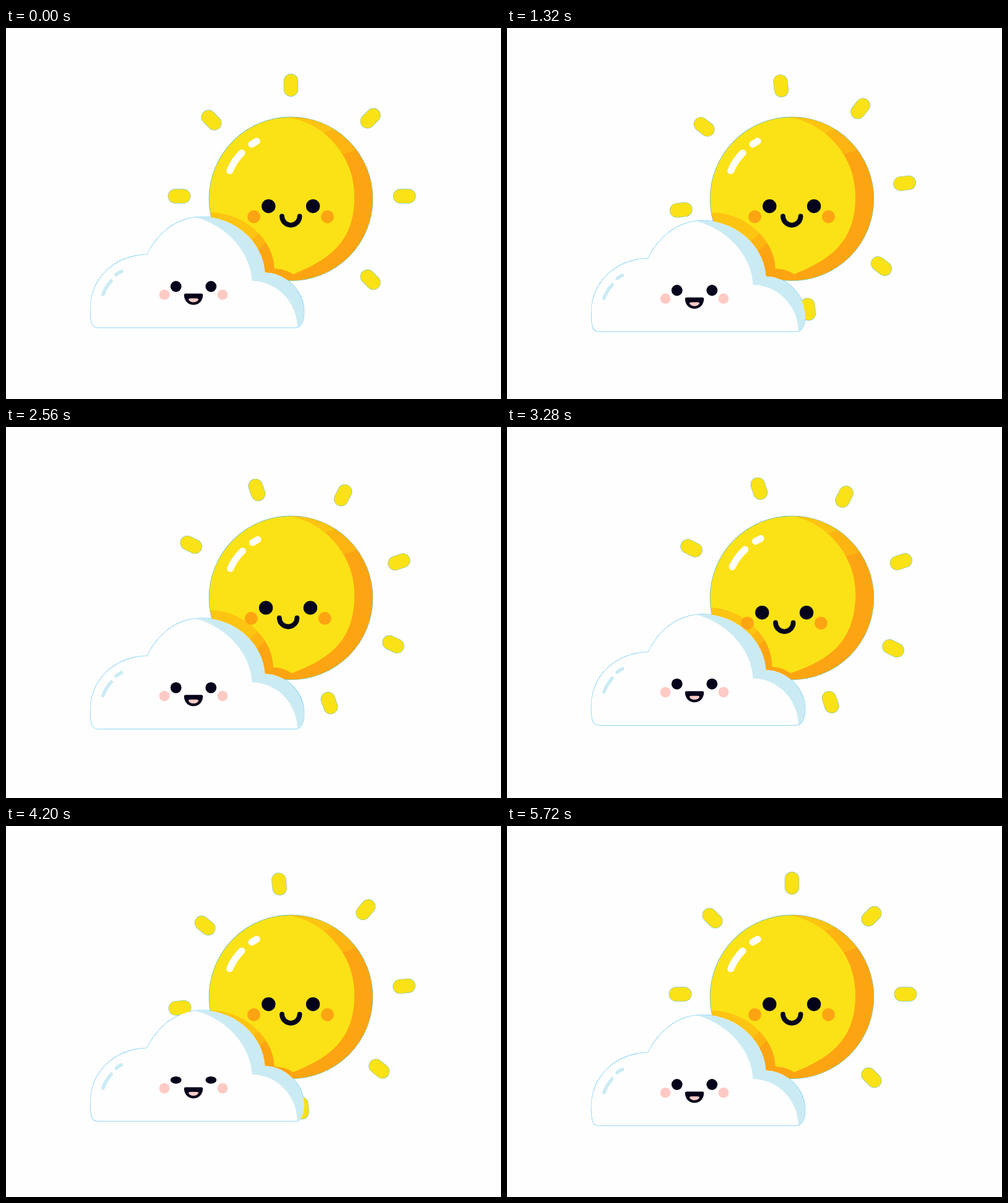
Animation, 800 px wide and 600 px high, one loop 5760 ms. Source, as an HTML page with a canvas:

```html
<!DOCTYPE html>
<html lang="en">
<head>
<meta charset="utf-8">
<title>Sun and cloud</title>
<style>
  html, body { margin: 0; width: 100%; height: 100%; overflow: hidden; background: #fefefe; }
  canvas { display: block; }
</style>
</head>
<body>
<canvas id="stage" width="800" height="600"></canvas>
<script>
const ctx = document.getElementById('stage').getContext('2d');
const LOOP = 5760, STEP = 40, SPAN = LOOP - STEP;
const INK = '#04031b', YELLOW = '#fae216', ORANGE = '#fda412';
const AMBER = '#feb512', GOLD = '#fec412', ICE = '#cbebf4', PINK = '#ffcac4';
const SUN = { x: 460.5, y: 276.3, r: 132 };
const HUB = { x: 462.1, y: 274.6 };

// Ray centres relative to the hub, clockwise from the top
const RAYS = [
  [-1.6, -182.1], [126.9, -128.6], [181.9, -2.6], [126.9, 132.4],
  [-2.3, 181.9], [-131.3, 128.6], [-182.1, -2.6], [-130.1, -125.6]
];

const sunDisc = new Path2D();
sunDisc.arc(SUN.x, SUN.y, SUN.r, 0, Math.PI * 2);

const sunShade = new Path2D(
  'M455 144 C512 152 563 205 563 272 C563 340 530 372 464 398 ' +
  'C457 393 446 389 434 389 C433 340 380 296 326 299 ' +
  'L300 299 V430 H620 V130 H455 Z');
const amberBands = new Path2D(
  'M450 130 H620 V179 L525 211 Z M300 280 H350 L434 334 L390 375 L300 375 Z');
const goldBands = new Path2D(
  'M440 130 H545 V158 L505 173 Z M300 280 H350 L421 320 L378 360 L300 360 Z');

const cloudBody = new Path2D(
  'M150 484.5 H468 C477 484.5 482 472 481.5 458 C481 428 455 396 418.5 395.5 ' +
  'C416 348 372 306 318 305.5 C274 305 244 334 228 366.5 ' +
  'C175 368 136.5 405 136.5 455 C136.5 464 137 470 138 475 Q139.5 484.5 150 484.5 Z');
const cloudShade = new Path2D(
  'M305 306 C355 318 396 362 397.5 409 C440 410 471 445 471 486 ' +
  'H500 V380 H430 V300 H305 Z');
const cloudMouth = new Path2D(
  'M290.5 429.6 H315.5 Q318.6 429.6 318.2 433 C317.5 442 311 447.8 303 447.8 ' +
  'C295 447.8 288.5 442 287.8 433 Q287.4 429.6 290.5 429.6 Z');
const cloudTongue = new Path2D(
  'M295 439 Q295 437.2 298 437.2 H308 Q311 437.2 311 439 ' +
  'C310 442 307 443.4 303 443.4 C299 443.4 296 442 295 439 Z');

const clamp = v => Math.max(0, Math.min(1, v));
const smooth = v => { v = clamp(v); return v * v * (3 - 2 * v); };

// Linear interpolation over [time, value] pairs
function track(keys, t) {
  for (let i = 1; i < keys.length; i++) {
    const [t0, a] = keys[i - 1], [t1, b] = keys[i];
    if (t <= t1) return a + (b - a) * (t - t0) / (t1 - t0);
  }
  return keys[keys.length - 1][1];
}

const bob = t => track([[0, 0], [1915, 9.1], [3970, -8.3], [SPAN, 0]], t);
const glance = t => smooth((t - 2400) / 400) * (1 - smooth((t - 3600) / 400));
const blink = (t, mid) => 0.1 + 0.9 * clamp(Math.abs(t - mid) / 120);

function fill(path, color) {
  ctx.fillStyle = color;
  ctx.fill(path);
}

function outline(path, color) {
  ctx.strokeStyle = color;
  ctx.lineWidth = 1.5;
  ctx.stroke(path);
}

function oval(x, y, rx, ry, color) {
  ctx.fillStyle = color;
  ctx.beginPath();
  ctx.ellipse(x, y, rx, ry, 0, 0, Math.PI * 2);
  ctx.fill();
}

function brush(d, width, color) {
  ctx.strokeStyle = color;
  ctx.lineWidth = width;
  ctx.lineCap = 'round';
  ctx.stroke(new Path2D(d));
}

function placed(draw, dx, dy) {
  ctx.save();
  ctx.translate(dx, dy);
  draw();
  ctx.restore();
}

function rays(t, width, color) {
  ctx.save();
  ctx.translate(HUB.x, HUB.y);
  ctx.rotate(t / SPAN * Math.PI * 2);
  RAYS.forEach(([x, y], i) => {
    ctx.save();
    ctx.translate(x, y);
    ctx.rotate(i * Math.PI / 4);
    brush('M0 -6.7 V6.7', width, color);
    ctx.restore();
  });
  ctx.restore();
}

function sunFace(lid) {
  oval(400.5, 305.2, 10.5, 10.5, ORANGE);
  oval(519.5, 305.2, 10.5, 10.5, ORANGE);
  oval(424.3, 288.2, 11.2, 11.2 * lid, INK);
  oval(496.1, 288.2, 11.2, 11.2 * lid, INK);
  brush('M446 304.5 A14.3 14.3 0 0 0 474.6 304.5', 7.8, INK);
}

function sun(t) {
  const look = glance(t);
  fill(sunDisc, YELLOW);
  ctx.save();
  ctx.clip(sunDisc);
  ctx.translate(SUN.x, SUN.y);
  ctx.rotate(look * 0.05);
  ctx.translate(-SUN.x, -SUN.y);
  ctx.save();
  ctx.clip(sunShade);
  fill(sunShade, ORANGE);
  fill(amberBands, AMBER);
  fill(goldBands, GOLD);
  ctx.restore();
  brush('M361.7 231 Q368 215 381 202', 11, '#fefefe');
  brush('M397 188 L405.3 183', 11, '#fefefe');
  ctx.restore();
  placed(() => sunFace(blink(t, 1960)), -12 * look, 12 * look);
}

function cloud(t) {
  const lid = blink(t, 4275);
  fill(cloudBody, '#fefefe');
  ctx.save();
  ctx.clip(cloudBody);
  fill(cloudShade, ICE);
  ctx.restore();
  brush('M156.8 431 Q161 419 170 408.8', 5.6, ICE);
  brush('M178 399 Q181 396 186.6 393.6', 5.6, ICE);
  oval(256, 431.4, 8.4, 8.4, PINK);
  oval(350, 431.4, 8.4, 8.4, PINK);
  oval(274.7, 418, 8.9, 8.9 * lid, INK);
  oval(331.3, 418, 8.9, 8.9 * lid, INK);
  fill(cloudMouth, INK);
  fill(cloudTongue, PINK);
}

function draw(t) {
  const dy = bob(t);
  ctx.fillStyle = '#fefefe';
  ctx.fillRect(0, 0, 800, 600);
  // Hairline edges lie beneath all fills, so they show only on the backdrop
  rays(t, 23.4, '#79c3b4');
  outline(sunDisc, '#5fbdbb');
  placed(() => outline(cloudBody, '#6ccaf8'), 0, dy);
  rays(t, 22.2, YELLOW);
  sun(t);
  placed(() => cloud(t), 0, dy);
}

const start = performance.now();
function tick() {
  const t = (performance.now() - start) % LOOP;
  draw(Math.floor(t / STEP) * STEP);
  requestAnimationFrame(tick);
}
tick();
</script>
</body>
</html>
```
